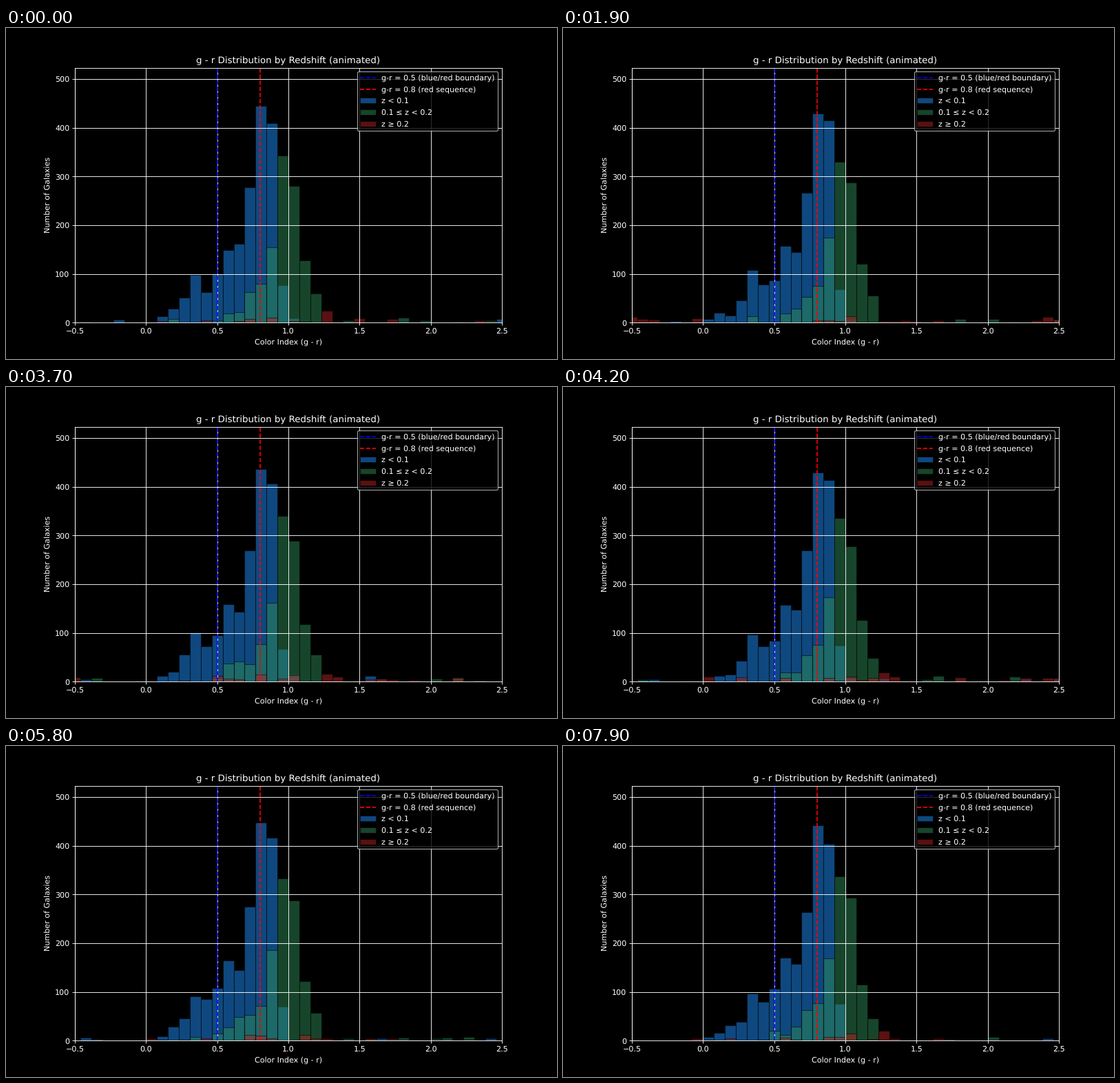
A matplotlib script for the animation above (8000 ms loop, 800x480 px).

```python
import numpy as np
import matplotlib.pyplot as plt
from matplotlib.animation import FuncAnimation

FRAMES, STEP = 80, 100
BINS, WIDTH = 40, 1 / 13
EDGES = -1 + WIDTH * np.arange(6, 6 + BINS)


def counts(rng, first, body):
    """Noisy counts per frame: a fixed profile, sparse strays elsewhere."""
    base = np.full(BINS, -5.0)
    base[first:first + len(body)] = body
    noise = rng.normal(0, 7, (FRAMES, BINS))
    return np.clip(np.round(base + noise), 0, None)


plt.style.use("dark_background")
plt.rcParams.update({"font.family": "DejaVu Sans", "text.hinting": "none"})

fig, ax = plt.subplots(figsize=(10, 6), dpi=80)
ax.set(
    xlim=(-0.5, 2.5), ylim=(0, 523),
    title="g - r Distribution by Redshift (animated)",
    xlabel="Color Index (g - r)", ylabel="Number of Galaxies",
)
ax.grid(True)
ax.axvline(0.5, color="blue", ls="--", label="g-r = 0.5 (blue/red boundary)")
ax.axvline(0.8, color="red", ls="--", label="g-r = 0.8 (red sequence)")

# Label, colour, first bin and mean profile of each redshift group.
GROUPS = [
    ("z < 0.1", "dodgerblue", 7, [8, 14, 22, 51, 95, 75, 98, 155, 150, 272, 438, 409, 72, 4]),
    ("0.1 ≤ z < 0.2", "seagreen", 13, [5, 20, 31, 55, 74, 168, 338, 286, 122, 56]),
    ("z ≥ 0.2", "firebrick", 14, [2, 2, 4, 4, 2, 2, 8, 0, 2, 13, 3]),
]

rng = np.random.default_rng(12)
layers = []
for label, color, first, body in GROUPS:
    heights = counts(rng, first, body)
    bars = ax.bar(EDGES, heights[0], WIDTH, align="edge", color=color,
                  edgecolor="black", alpha=0.5, label=label)
    layers.append((bars, heights))
ax.legend(loc="upper right", labelspacing=0.54)


def update(frame):
    for bars, heights in layers:
        for bar, height in zip(bars, heights[frame]):
            bar.set_height(height)
    return []


anim = FuncAnimation(fig, update, frames=FRAMES, interval=STEP, repeat=True, repeat_delay=0)
plt.show()
```
